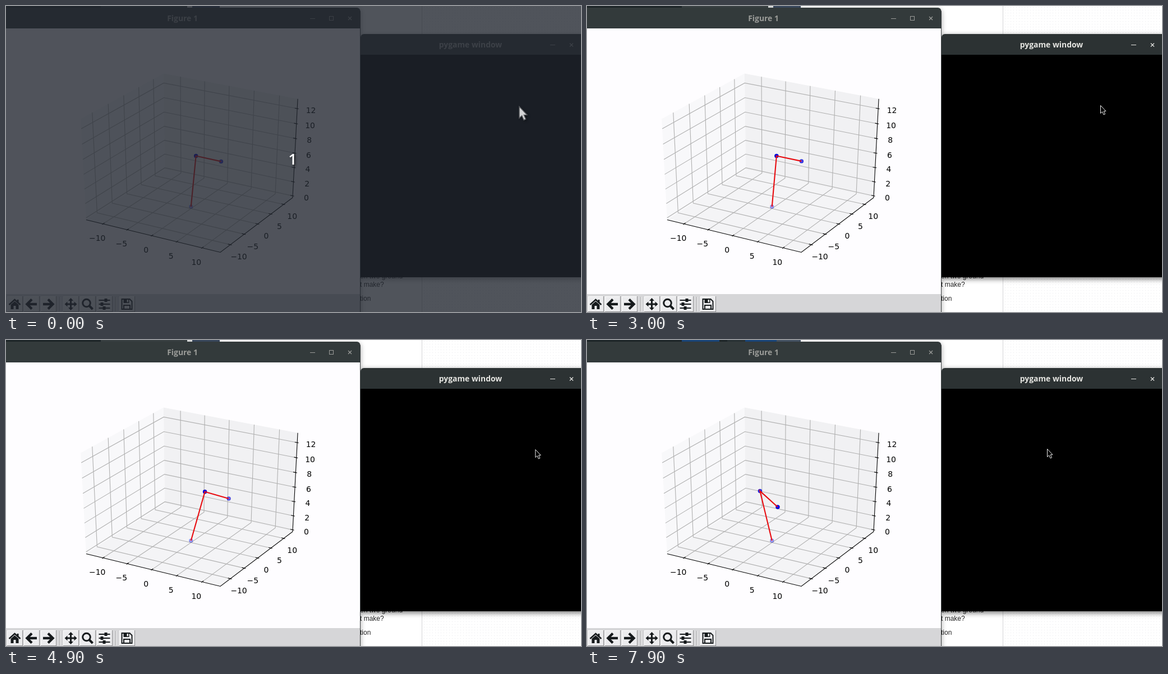
These frames come from a looping animation (1025x546 px, 8 s). An HTML page with a canvas:

```html
<!DOCTYPE html>
<html lang="en">
<head>
<meta charset="utf-8">
<title>Arm control</title>
<style>
html, body { margin: 0; width: 100%; height: 100%; overflow: hidden; background: #fff; }
canvas { display: block; }
</style>
</head>
<body>
<canvas id="stage" width="1025" height="546"></canvas>
<script>
const ctx = document.getElementById('stage').getContext('2d');
const W = 1025, H = 546, LOOP = 8000, TAU = 2 * Math.PI;

function rect(x, y, w, h, color) { ctx.fillStyle = color; ctx.fillRect(x, y, w, h); }
function trace(points, closed) {
  ctx.beginPath();
  points.forEach(p => ctx.lineTo(...p));
  if (closed) ctx.closePath();
}
function stroke(color, width) { ctx.strokeStyle = color; ctx.lineWidth = width; ctx.stroke(); }
function line(points, color, width = 1) { trace(points); stroke(color, width); }
function poly(points, color) { trace(points, true); ctx.fillStyle = color; ctx.fill(); }
function circle(x, y, r) { ctx.beginPath(); ctx.arc(x, y, r, 0, TAU); }
function text(s, x, y, font, color, align = 'center') {
  ctx.font = font; ctx.fillStyle = color; ctx.textAlign = align;
  ctx.fillText(s, x, y);
}

// Perspective view of a cube with sides -1..1, azimuth -60, elevation 30 degrees
const C = Math.sqrt(3) / 2;
const nearness = ([x, y, z]) => C / 2 * x - .75 * y + z / 2;
function project([x, y, z]) {
  const depth = 20 - nearness([x, y, z]);
  return [329.75 + 2761 * (C * x + y / 2) / depth,
          274.6 - 2056 * (-x / 4 + C / 2 * y + C * z) / depth];
}
const view = points => points.map(project);

// The plot spans -13..13 on the floor and 0..13 in height, plus a margin
const SPAN = 13 * 25 / 24;
const flat = v => v / SPAN, high = z => (z - 6.5) / (SPAN / 2);
const place = (x, y, z) => [flat(x), flat(y), high(z)];

const AXES = [
  { from: -10, step: 5, scale: flat, dx: -10.3, dy: 25,
    grid: k => [[k, -1, -1], [k, 1, -1], [k, 1, 1]], tick: (k, d) => [k, -1 + d, -1] },
  { from: -10, step: 5, scale: flat, dx: 15, dy: 21.5,
    grid: k => [[1, k, -1], [-1, k, -1], [-1, k, 1]], tick: (k, d) => [1 - d, k, -1] },
  { from: 0, step: 2, scale: high, dx: 24.3, dy: 3,
    grid: k => [[1, 1, k], [-1, 1, k], [-1, -1, k]], tick: (k, d) => [1 - d, 1, k] }
];
function eachTick(draw) {
  for (const a of AXES)
    for (let n = a.from; n <= 12; n += a.step) draw(a, a.scale(n), n);
}

function plot() {
  poly(view([[-1, -1, 1], [-1, 1, 1], [-1, 1, -1], [-1, -1, -1]]), '#f8f8fa');
  poly(view([[-1, 1, 1], [1, 1, 1], [1, 1, -1], [-1, 1, -1]]), '#f1f1f3');
  poly(view([[-1, -1, -1], [-1, 1, -1], [1, 1, -1], [1, -1, -1]]), '#f4f4f6');
  eachTick((a, k) => line(view(a.grid(k)), '#b0b0b0', 1.1));
  line(view([[-1, -1, -1], [1, -1, -1], [1, 1, -1], [1, 1, 1]]), '#000', 1.1);
  eachTick((a, k, n) => {
    line(view([a.tick(k, -.02), a.tick(k, .035)]), '#000', 1.1);
    const [x, y] = project(a.tick(k, 0));
    text(String(n).replace('-', '\u2212'), x + a.dx, y + a.dy + 5,
      '13.9px "DejaVu Sans", sans-serif', '#000');
  });
}

// time, hand position x y z, pointer x y
const KEYS = [
  [0, 3.49, 4.6, 5.64, 914, 178],
  [1300, 3.49, 4.6, 5.64, 914, 178],
  [2200, 3.37, 4.6, 5.66, 916, 178],
  [3000, 3.37, 4.6, 5.66, 916, 178],
  [4300, 6.63, 4.65, 5.6, 923.5, 184],
  [5600, 1.3, 8.02, 4.1, 968.5, 210],
  [6700, 1.36, 1.33, -1.28, 840.5, 303],
  [7000, 1.4, .5, -4.2, 826, 355],
  [7900, 1.47, -.54, 5.07, 821, 195]
];
function pose(t) {
  let i = 0;
  while (i < KEYS.length - 2 && KEYS[i + 1][0] <= t) i++;
  const a = KEYS[i], b = KEYS[i + 1], k = (t - a[0]) / (b[0] - a[0]);
  return a.map((v, n) => v + (b[n] - v) * k);
}

// Links of length 7 and 5 reach for the hand position, elbow up
function arm(x, y, z) {
  const yaw = Math.atan2(y, x), r = Math.hypot(x, y), reach = Math.hypot(r, z);
  const bend = Math.acos(Math.min(1, (49 + reach * reach - 25) / (14 * reach)));
  const pitch = Math.atan2(z, r) + bend, out = 7 * Math.cos(pitch);
  const joints = [place(0, 0, 0),
    place(out * Math.cos(yaw), out * Math.sin(yaw), 7 * Math.sin(pitch)), place(x, y, z)];
  const near = joints.map(nearness), min = Math.min(...near), max = Math.max(...near);
  joints.forEach((j, i) => {
    ctx.globalAlpha = .3 + .7 * (near[i] - min) / (max - min);
    circle(...project(j), 3);
    ctx.fillStyle = '#00f'; ctx.fill();
    stroke('#0000c8', 1.4);
  });
  ctx.globalAlpha = 1;
  line(view(joints), '#e80c10', 2.1);
}

function desktop(t) {
  rect(0, 0, W, H, '#fff');
  rect(741, 0, 1, H, '#d4d4d6');
  for (let x = 745; x < W; x += 5)
    for (let y = 2; y < H; y += 5) rect(x, y, 1, 1, '#e8e8ec');
  rect(0, 0, 380, 12, '#20282b');
  if (t < 5700) {
    rect(169, 0, 154, 12, '#3c4446');
    rect(323, 0, 9, 12, '#e4e6e6');
    rect(332, 0, 49, 12, '#3d4c62');
  } else {
    rect(169, 0, 67, 12, '#1c4a80');
    rect(250, 0, 32, 12, '#2b3538');
    rect(282, 0, 56, 12, '#1c4a80');
    rect(338, 0, 43, 12, '#4a586a');
  }
  const font = '12px "Liberation Sans", Arial, sans-serif';
  text('en two ground', 631, 486, font, '#222', 'left');
  text('t make?', 631, 501, font, '#222', 'left');
  text('tion', 631, 526, font, '#222', 'left');
}

function frame(x, y, w, h, title, cx, ink, color, shade) {
  ctx.save();
  ctx.shadowColor = `rgba(0,0,0,${shade})`; ctx.shadowBlur = 10; ctx.shadowOffsetY = 3;
  ctx.beginPath(); ctx.roundRect(x, y, w, h, [6, 6, 0, 0]);
  ctx.fillStyle = color; ctx.fill();
  ctx.restore();
  text(title, cx, y + 24, 'bold 13.9px "Open Sans", sans-serif', ink);
}
function minimise(x, y, ink) { line([[x - 4, y], [x + 5, y]], ink); }
function closeMark(x, y, ink) {
  for (const s of [-3, 3]) line([[x - 3, y - s], [x + 3, y + s]], ink, 1.2);
}

const INK = '#161a1c';
function arrow(dir) {
  ctx.scale(dir, 1);
  line([[-9.5, 0], [7, 0]], INK, 4.4);
  line([[-.5, -8.5], [8, 0], [-.5, 8.5]], INK, 4.4);
}
function home() {
  line([[-10, 1], [0, -8], [10, 1]], INK, 2.6);
  rect(4, -8, 3, 6, INK);
  poly([[-7, 1], [0, -5], [7, 1], [7, 9], [2, 9], [2, 3], [-2, 3], [-2, 9], [-7, 9]], INK);
}
function pan() {
  for (let i = 0; i < 4; i++) {
    ctx.rotate(TAU / 4);
    rect(-1.5, -9, 3, 9, INK);
    poly([[0, -11], [4.5, -6], [-4.5, -6]], INK);
  }
}
function zoom() {
  circle(-2, -2, 6.8); stroke(INK, 3);
  line([[3, 3], [9, 9]], INK, 4);
}
function sliders() {
  [3, -4, 0].forEach((x, i) => {
    rect(-10, 7 * i - 8, 20, 2, INK);
    rect(x - 3, 7 * i - 10, 5, 6, INK);
  });
}
function save() {
  trace([[-9, -9], [5, -9], [9, -5], [9, 9], [-9, 9]], true); stroke(INK, 2);
  rect(-6, -9, 10, 7, INK); rect(0, -8, 2.5, 4.5, '#eee');
  ctx.strokeRect(-5.5, 2, 11, 7);
}

function toolbar() {
  rect(0, 514, 631, 32, '#d6d6d8');
  let x = 2;
  for (const icon of [home, () => arrow(-1), () => arrow(1), null, pan, zoom, sliders, null, save]) {
    if (!icon) {
      rect(x + 3, 519, 1, 26, '#a8a8aa'); rect(x + 4, 519, 1, 26, '#f4f4f4');
      x += 10;
      continue;
    }
    rect(x, 518, 28, 28, '#8e8e90');
    rect(x, 518, 27, 27, '#fff');
    rect(x + 1, 519, 26, 26, '#ececee');
    ctx.save();
    ctx.translate(x + 13.5, 532);
    icon();
    ctx.restore();
    x += 30;
  }
}

function figure(hand) {
  const ink = '#9b9c99';
  frame(-8, 3, 639.5, 560, 'Figure 1', 314.5, ink, '#333a3b', .4);
  minimise(546, 22.5, ink);
  ctx.strokeStyle = ink; ctx.strokeRect(576.5, 18.5, 7, 7);
  closeMark(613, 22, ink);
  rect(0, 40, 631, 474, '#fefdff');
  plot();
  arm(...hand);
  toolbar();
  rect(631, 9, 1, H, '#3d4243');
}

function pygame(focused) {
  const ink = focused ? '#e6e6e2' : '#a2a3a0';
  ctx.save();
  ctx.beginPath(); ctx.rect(632, 0, W, H); ctx.clip();
  frame(632, 50, 400, 434, 'pygame window', 828, ink,
    focused ? '#2c3233' : '#333a3b', focused ? .55 : .4);
  rect(632, 87, 393, 397, '#000');
  minimise(974, 69.5, ink);
  closeMark(1008, 69.5, ink);
  ctx.restore();
}

function pointer(x, y, scale, fill, edge) {
  ctx.save();
  ctx.translate(x - .5, y - .5); ctx.scale(scale, scale);
  poly([[0, 0], [0, 14], [3.2, 11.2], [5.6, 16.5], [8, 15.4], [5.7, 10.3], [9.5, 10.1]], fill);
  ctx.shadowColor = 'transparent';
  stroke(edge, 1);
  ctx.restore();
}

function countdown() {
  rect(0, 0, W, H, 'rgba(34,39,47,.79)');
  ctx.save();
  ctx.shadowColor = 'rgba(0,0,0,.6)'; ctx.shadowBlur = 4;
  ctx.shadowOffsetX = ctx.shadowOffsetY = 2;
  text('1', 511, 283, '600 27px "Open Sans", sans-serif', '#fff');
  pointer(915.5, 180, 1.45, '#d4d5d6', '#5a5c60');
  ctx.restore();
}

function draw() {
  const t = Math.floor(performance.now() % LOOP / 100) * 100;
  const [, x, y, z, px, py] = pose(t);
  desktop(t);
  figure([x, y, z]);
  pygame(t >= 2400);
  if (t < 100) countdown();
  else pointer(px, py, 1, '#000', '#eee');
  requestAnimationFrame(draw);
}
draw();
</script>
</body>
</html>
```
